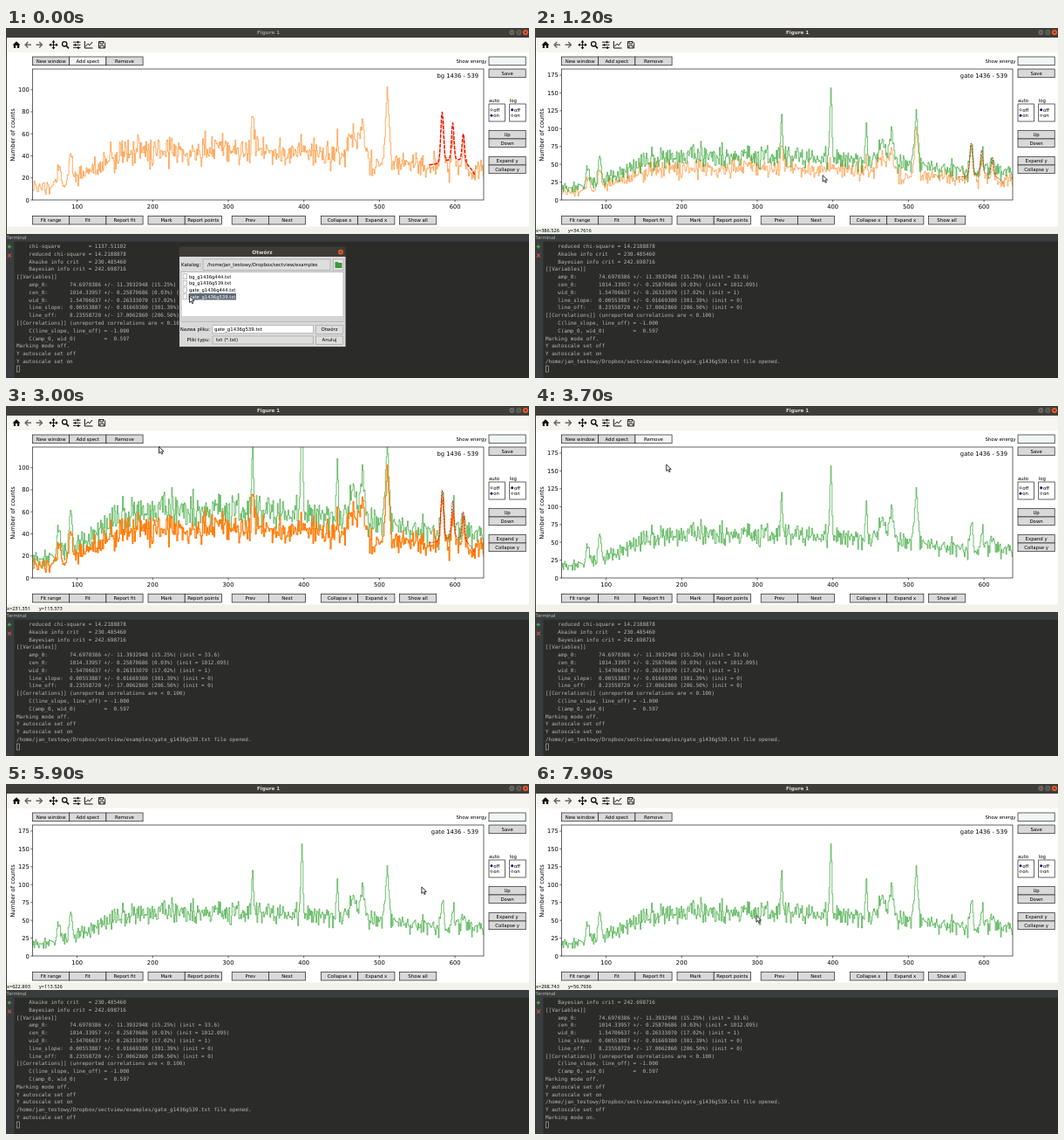
Animation of 600 by 401 pixels, one loop 8000 ms. Source, as an HTML page:

```html
<!DOCTYPE html>
<html lang="en">
<head>
<meta charset="utf-8">
<style>
html, body { margin: 0; width: 100%; height: 100%; overflow: hidden; background: #fff; }
svg { display: block; width: 600px; height: 401px; font: 5.4px "DejaVu Sans", sans-serif; }
text { white-space: pre; }
.axis { font-size: 6.75px; }
.term { font: 5.98px "DejaVu Sans Mono", monospace; fill: #b6b7b2; }
.ui { font: 5.6px "Noto Sans", sans-serif; }
</style>
</head>
<body>
<svg id="stage" viewBox="0 0 600 401"></svg>
<script>
const LOOP = 8000, TICK = 100;
const AX = { l: 30.5, r: 548, t: 47, b: 197 };
const BG = { top: 118.8, step: 20, name: 'bg 1436 - 539' };
const GATE = { top: 183.5, step: 25, name: 'gate 1436 - 539' };

// data to stage coordinates and back
const UNIT = 0.867, ORIGIN = 81.6 - 100 * UNIT;
const px = x => ORIGIN + x * UNIT;
const py = (y, scale) => AX.b - y * (AX.b - AX.t) / scale.top;
const toData = (x, y, scale) => [(x - ORIGIN) / UNIT, (AX.b - y) * scale.top / (AX.b - AX.t)];

// markup helpers
const mid = 'text-anchor="middle"', end = 'text-anchor="end"';
const frame = 'stroke="#222" stroke-width=".7"', thin = 'stroke="#999" stroke-width=".6"';
const rect = (x, y, w, h, fill, extra = '') =>
  `<rect x="${x}" y="${y}" width="${w}" height="${h}" fill="${fill}" ${extra}/>`;
const text = (x, y, s, extra = '') => `<text x="${x}" y="${y}" ${extra}>${s.replace(/</g, '&lt;')}</text>`;
const shape = (d, fill) => `<path d="${d}" fill="${fill}"/>`;
const stroke = (d, color, w = 1, extra = '') =>
  `<path d="${d}" fill="none" stroke="${color}" stroke-width="${w}" stroke-linejoin="round" ${extra}/>`;
const dot = (x, y, r, fill, extra = '') => `<circle cx="${x}" cy="${y}" r="${r}" fill="${fill}" ${extra}/>`;
const cross = (x, y, r, color, w) =>
  stroke(`M${x - r} ${y - r}L${x + r} ${y + r}M${x + r} ${y - r}L${x - r} ${y + r}`, color, w);

const clamp = u => Math.min(1, Math.max(0, u));
const ease = u => (u = clamp(u), u * u * (3 - 2 * u));

// spectra: peaks as centre, width, height in gate, height in bg
const peaks = [
  [75, 2, 32, 16], [91, 2, 36, 24], [332, 1.3, 60, 36], [397, 1.3, 104, 10], [444, 1.2, 46, 16],
  [464, 4, 32, 24], [477, 3.5, 38, 30], [510, 2.2, 74, 64], [583, 1.8, 42, 45], [597, 1.6, 22, 33], [611, 1.6, 20, 25],
].map(([at, width, gate, bg]) => ({ at, width, gate, bg }));
const peakSum = (list, kind, x) =>
  list.reduce((sum, p) => sum + p[kind] * Math.exp(-(((x - p.at) / p.width) ** 2) / 2), 0);
const continuum = x => 16 + 46 * ease((x - 50) / 140) - 22 * ease((x - 300) / 330);

function random(seed) {
  return () => (seed = (seed * 16807) % 2147483647) / 2147483647;
}
function spectrum(kind, level, seed) {
  const rnd = random(seed);
  return Array.from({ length: 598 }, (_, i) => {
    const x = 41 + i, mean = level * continuum(x);
    const noise = (rnd() + rnd() + rnd() - 1.5) * 2 * Math.sqrt(mean);
    return [x, mean + peakSum(peaks, kind, x) + noise];
  });
}
const gateData = spectrum('gate', 1, 4711);
const bgData = spectrum('bg', 0.74, 9127);
const fitData = Array.from({ length: 121 }, (_, i) => {
  const u = i / 120, x = 566 + 60 * u;
  return [x, 32 + 48 * u ** 2 - 57 * u ** 3 + peakSum(peaks.slice(-3), 'bg', x)];
});

function curve(data, scale, stepped) {
  return data.map(([x, y], i) => {
    const h = px(x).toFixed(1), v = py(y, scale).toFixed(1);
    return i ? (stepped ? `H${h}V${v}` : `L${h} ${v}`) : `M${h} ${v}`;
  }).join('');
}
const orange = (scale, w, opacity) => stroke(curve(bgData, scale, true), '#ff7f0e', w, `opacity="${opacity}"`);
const green = scale => stroke(curve(gateData, scale, true), '#2ca02c', 0.8, 'opacity=".85"');
const fit = (scale, w, color) => stroke(curve(fitData, scale), color, w, `stroke-dasharray="${w * 3} ${w}"`);

function plot(scale, lines) {
  let s = `<g clip-path="url(#axes)">${lines}</g>` + text(542, 57, scale.name, end + ' class="axis"');
  for (let v = 0; v < scale.top; v += scale.step) {
    const y = py(v, scale);
    s += stroke(`M${AX.l}  ${y}h-2.3`, '#000', 0.6) + text(26.8, y + 2.5, String(v), end + ' class="axis"');
  }
  return s;
}
const views = [
  { at: 0, scale: BG, svg: plot(BG, orange(BG, 0.8, 0.8) + fit(BG, 1.4, '#ee100c')) },
  { at: 300, scale: GATE, svg: plot(GATE, orange(GATE, 0.7, 0.8) + fit(GATE, 0.9, '#d8140c') + green(GATE)) },
  { at: 1400, scale: BG, svg: plot(BG, green(BG) + orange(BG, 1.25, 1) + fit(BG, 0.9, '#d8140c')) },
  { at: 3700, scale: GATE, svg: plot(GATE, green(GATE)) },
];

// terminal
const VISIBLE = 16, logTimes = [200, 5800, 6800];
const log = `    chi-square         = 1137.51102
    reduced chi-square = 14.2188878
    Akaike info crit   = 230.485460
    Bayesian info crit = 242.698716
[[Variables]]
    amp_0:       74.6970386 +/- 11.3932948 (15.25%) (init = 33.6)
    cen_0:       1014.33957 +/- 0.25870686 (0.03%) (init = 1012.095)
    wid_0:       1.54706637 +/- 0.26333070 (17.02%) (init = 1)
    line_slope:  0.00553887 +/- 0.01669380 (301.39%) (init = 0)
    line_off:    8.23558720 +/- 17.0062860 (206.50%) (init = 0)
[[Correlations]] (unreported correlations are < 0.100)
    C(line_slope, line_off) = -1.000
    C(amp_0, wid_0)         =  0.597
Marking mode off.
Y autoscale set off
Y autoscale set on
/home/jan_testowy/Dropbox/sectview/examples/gate_g1436g539.txt file opened.
Y autoscale set off
Marking mode on.`.split('\n');

// pointer moves: start, end, target x, target y
const moves = [
  [400, 1100, px(386.526), py(34.7616, GATE)],
  [1600, 1900, px(211.884), py(105.494, BG)],
  [1900, 2000, 174.7, 62.8],
  [2100, 2400, 217, 56],
  [2700, 3300, 134, 37],
  [3600, 3700, 150.7, 67],
  [3700, 5000, 552, 105],
  [5000, 5200, 557, 99],
  [5700, 6500, 43.8, 220],
  [6800, 7700, px(298.743), py(56.7936, GATE)],
];
function pointerAt(t) {
  let at = [210.5, 307];
  for (const [from, to, ...goal] of moves) {
    const u = ease((t - from) / (to - from));
    at = at.map((v, i) => v + (goal[i] - v) * u);
  }
  return at;
}

// window parts
const COL = 42.2, ROW = 9.7;
const button = (x, y, label, cls = 'button') =>
  rect(x, y, COL, ROW, '#d9d9d9', `${frame} class="${cls}"`) + text(x + COL / 2, y + 6.8, label, mid);
const row = (x, y, ...labels) => labels.map((s, i) => button(x + i * COL, y, s)).join('');
const column = (x, y, ...labels) => labels.map((s, i) => button(x, y + i * ROW, s)).join('');

function titleBar() {
  return rect(0, 0, 600, 11, '#3e3d39') + text(301, 7.4, 'Figure 1', mid + ' id="title" font-weight="bold" font-size="5.6"') +
    dot(580.3, 5, 3, '#6e6b64') + stroke('M578.8 5h3', '#2e2d2a', 0.7) +
    dot(588.3, 5, 3, '#6e6b64') + rect(587.1, 3.8, 2.4, 2.4, 'none', 'stroke="#2e2d2a" stroke-width=".6"') +
    dot(596, 5, 3.1, '#e9592b') + cross(596, 5, 1.1, '#4a2115', 0.7);
}
function toolbar() {
  const ink = '#111', arrowHeads = [0, 90, 180, 270].map(a =>
    `<path d="M0-5.2L1.9-2.8H-1.9Z" transform="translate(54.5 19.3) rotate(${a})"/>`).join('');
  const sliders = [82.5, 79.5, 83].map((x, i) => {
    const y = 16.2 + i * 3.2;
    return stroke(`M77 ${y}h8.5`, ink, 0.9) + stroke(`M${x} ${y - 1.3}v2.6`, ink, 1.5);
  }).join('');
  return rect(0, 11, 600, 17, '#f6f5f0') +
    shape('M7.5 19.5L12 15.2L16.5 19.5H15.2V23H13V20H11V23H8.8V19.5Z', ink) +
    stroke('M29 19.3h-6.5m2.8-3.3l-3.3 3.3l3.3 3.3', '#666', 1.4) +
    stroke('M34.5 19.3h6.5m-2.8-3.3l3.3 3.3l-3.3 3.3', '#666', 1.4) +
    stroke('M54.5 15v8.6M50.2 19.3h8.6', ink, 1.1) + arrowHeads +
    dot(67.2, 18.3, 2.7, 'none', `stroke="${ink}" stroke-width="1.3"`) + stroke('M69.2 20.4l2.8 3', ink, 1.6) + sliders +
    stroke('M90.3 15v8h9.2M91.5 21l2.5-2.8l2 1.6l3-3.8', ink) +
    stroke('M106.5 15.5h5.5l1.6 1.6v5.9h-7.1zm1.5 0v2.5h3.5v-2.5M108 23v-3h4v3', ink, 0.9);
}
function radio(x, name) {
  const choices = ['off', 'on'].map((s, i) =>
    dot(x + 3, 93.8 + i * 6.4, 1.2, '#fff', `stroke="#000" stroke-width=".5" id="${name}-${s}"`) +
    text(x + 5.2, 95.7 + i * 6.4, s)).join('');
  return text(x, 84.6, name) + rect(x, 87, 18.5, 20, '#fff', frame) + choices;
}
function axes() {
  let s = rect(AX.l, AX.t, AX.r - AX.l, AX.b - AX.t, 'none', frame) +
    text(0, 0, 'Number of counts', mid + ' class="axis" transform="translate(9.8 122.5) rotate(-90)"');
  for (let v = 100; v <= 600; v += 100)
    s += stroke(`M${px(v)} ${AX.b}v2.3`, '#000', 0.6) + text(px(v), 206.8, String(v), mid + ' class="axis"');
  return s;
}
function dialog() {
  const files = ['bg_g1436g444.txt', 'bg_g1436g539.txt', 'gate_g1436g444.txt', 'gate_g1436g539.txt'];
  const list = files.map((name, i) => {
    const y = 281.7 + i * 7.7, chosen = i === files.length - 1;
    return rect(203, y, 4.5, 6, '#f4f4f4', thin) + (chosen ? rect(209.5, y - 0.7, 54.5, 7.4, '#5c6672') : '') +
      text(210, y + 5, name, `font-size="5.25" fill="${chosen ? '#fff' : '#000'}"`);
  }).join('');
  const form = [['Nazwa pliku:', files[3], '#fff', 'Otwórz'], ['Pliki typu:', 'txt (*.txt)', '#dedede', 'Anuluj']]
    .map(([label, value, fill, action], i) => {
      const y = 340.8 + i * 12.2;
      return text(234, y + 6.4, label, end) + rect(237, y, 115.5, 9, fill, thin) + text(239 + 2 * i, y + 6.4, value) +
        rect(355.5, y, 31, 9.5, '#dedede', thin) + text(371, y + 6.4, action, mid);
    }).join('');
  return '<g id="dialog">' + rect(198.5, 250.5, 191.5, 20, '#3c3b37', 'rx="3.5"') + rect(198.5, 262, 191.5, 104, '#3c3b37') +
    rect(199, 262, 190.5, 103, '#d9d9d9') +
    text(294, 258.8, 'Otwórz', mid + ' fill="#dfdbd2" font-weight="bold" font-size="5.8"') +
    dot(384, 256.7, 2.9, '#e9592b') + cross(384, 256.7, 1.1, '#4a2115', 0.7) +
    text(201, 272.8, 'Katalog:') + rect(226, 265, 146, 12.5, '#dedede', thin) +
    text(231, 272.8, '/home/jan_testowy/Dropbox/sectview/examples', 'font-size="5.3"') +
    rect(375.5, 265, 11.5, 12.5, '#e4e4e4', thin) + shape('M377.500 268h3l1 1h4v6h-8z', '#3b9a3b') +
    rect(201, 279.5, 186, 57, '#fff', thin) + list + rect(201.5, 330, 185, 6, '#d4d4d4') + form + '</g>';
}
function terminal() {
  return rect(0, 236, 600, 165, '#2b2b29') + rect(0, 236, 600, 8.8, '#3a3d3d') + rect(0, 244, 9.5, 157, '#3a3d3d') +
    text(0.5, 242.4, 'Terminal', 'class="ui" fill="#bbb"') +
    shape('M1.5 250.5l2.8-2.5v1.700h1.700v1.600h-1.700v1.700z', '#4fa34f') + cross(4, 260.7, 2, '#c75450', 1.1) +
    '<g class="term" id="log"></g>' + rect(12.4, 387, 3, 7, 'none', 'stroke="#b6b7b2" stroke-width=".6"');
}

const stage = document.getElementById('stage');
stage.innerHTML =
  `<clipPath id="axes">${rect(AX.l, AX.t, AX.r - AX.l, AX.b - AX.t, '#000')}</clipPath>` +
  titleBar() + toolbar() +
  row(30.5, 33, 'New window', 'Add spect', 'Remove') +
  row(30.5, 215.3, 'Fit range', 'Fit', 'Report fit') + row(163, 215.3, 'Mark', 'Report points') +
  row(259.2, 215.3, 'Prev', 'Next') + row(361.5, 215.3, 'Collapse x', 'Expand x') + row(451.5, 215.3, 'Show all') +
  text(551.5, 39.5, 'Show energy', end) + rect(554, 33, COL, ROW, '#f0f6f4', frame) +
  button(554, 47, 'Save') + column(554, 117.3, 'Up', 'Down') + column(554, 147.3, 'Expand y', 'Collapse y') +
  radio(554, 'auto') + radio(577.7, 'log') + '<g id="plot"></g>' + axes() +
  rect(0, 227.5, 600, 9, '#f2f1ea') + '<g class="ui" id="status"></g>' +
  rect(0, 11, 1, 225, '#3e3d39') + terminal() + dialog() +
  '<path id="pointer" d="M0 0v7.6l1.8-1.600l1.300 2.700l1.300-.6l-1.200-2.600h2.400z" fill="#eee" stroke="#111" stroke-width=".8"/>';

const el = id => document.getElementById(id);
const fill = (node, color) => node.setAttribute('fill', color);
const choose = (name, on) => {
  fill(el(name + '-on'), on ? '#0000c8' : '#fff');
  fill(el(name + '-off'), on ? '#fff' : '#0000c8');
};
const hover = (node, on) => fill(node, on ? '#f4f4f4' : '#d9d9d9');
const inside = ([x, y], l, t, r, b) => x > l && x < r && y > t && y < b;
const [, addButton, removeButton] = stage.querySelectorAll('.button');
choose('log', false);

let shownView, shownLines;
function render(t) {
  const view = views.filter(v => v.at <= t).pop();
  if (view !== shownView) el('plot').innerHTML = (shownView = view).svg;

  const added = logTimes.filter(at => at <= t).length;
  if (added !== shownLines) {
    shownLines = added;
    el('log').innerHTML = log.slice(added, added + VISIBLE).map((s, i) => text(12, 252 + i * 8.8, s)).join('');
  }

  el('dialog').setAttribute('visibility', t < 100 ? 'visible' : 'hidden');
  fill(el('title'), t < 100 ? '#9a978f' : '#dfdbd2');
  choose('auto', t < 5700);
  el('pointer').setAttribute('transform', `translate(${pointerAt(t)})`);

  // the figure reacts one tick behind the pointer
  const seen = pointerAt(t - TICK);
  hover(addButton, t < 300);
  hover(removeButton, inside(seen, 115, 33, 157, 43));
  const [x, y] = toData(...seen, view.scale).map(v => v.toPrecision(6));
  el('status').innerHTML = inside(seen, AX.l, AX.t, AX.r, AX.b) ? text(1, 234, 'x=' + x) + text(38, 234, 'y=' + y) : '';
}

const start = performance.now();
function tick() {
  const t = (performance.now() - start) % LOOP;
  render(Math.floor(t / TICK) * TICK);
  requestAnimationFrame(tick);
}
tick();
</script>
</body>
</html>
```
